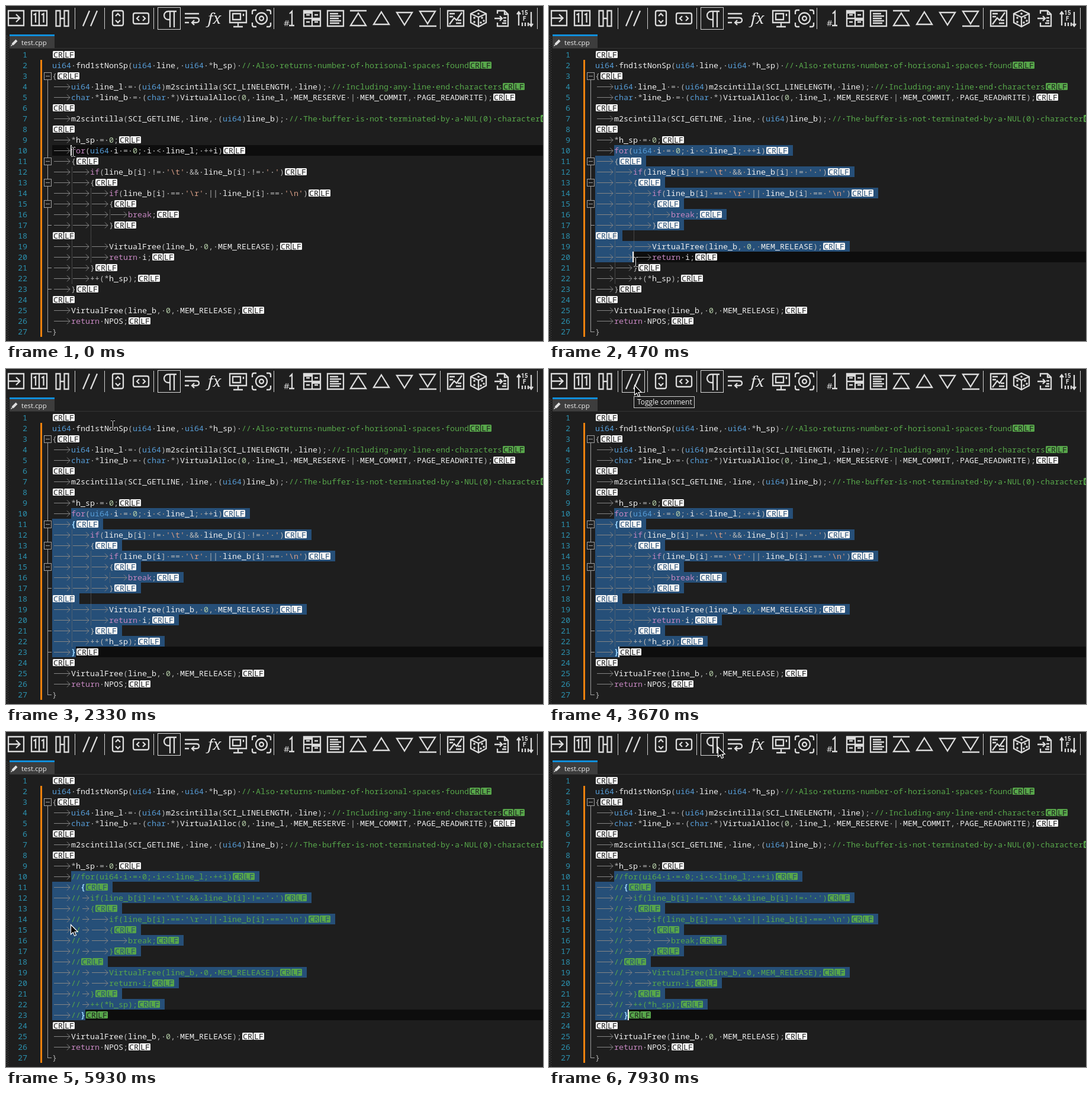
Recreate the animation shown at these times as an HTML page with a canvas. Size 907 px wide and 566 px high, loop 8 s.

```html
<!DOCTYPE html>
<html lang="en">
<head>
<meta charset="utf-8">
<title>Toggle comment</title>
<style>
html, body { margin: 0; width: 100%; height: 100%; overflow: hidden; background: #1e1e1e; }
canvas { display: block; }
</style>
</head>
<body>
<canvas id="stage" width="907" height="566"></canvas>
<script>
const c = document.getElementById('stage').getContext('2d');
const LOOP = 8000, LEFT = 78, CHAR = 8, ROW = 18, FIRST = 10, LAST = 23;
const MONO = '13.333px "Noto Sans Mono", monospace';
const UI = '12px "Open Sans", sans-serif';
const DRAG_END = 870, COMMENT_AT = 4070;

const code = String.raw`
ui64 fnd1stNonSp(ui64 line, ui64 *h_sp) // Also returns number of horisonal spaces found
{
>ui64 line_l = (ui64)m2scintilla(SCI_LINELENGTH, line); // Including any line end characters
>char *line_b = (char *)VirtualAlloc(0, line_l, MEM_RESERVE | MEM_COMMIT, PAGE_READWRITE);

>m2scintilla(SCI_GETLINE, line, (ui64)line_b); // The buffer is not terminated by a NUL(0) character

>*h_sp = 0;
>for(ui64 i = 0; i < line_l; ++i)
>{
>>if(line_b[i] != '\t' && line_b[i] != ' ')
>>{
>>>if(line_b[i] == '\r' || line_b[i] == '\n')
>>>{
>>>>break;
>>>}

>>>VirtualFree(line_b, 0, MEM_RELEASE);
>>>return i;
>>}
>>++(*h_sp);
>}

>VirtualFree(line_b, 0, MEM_RELEASE);
>return NPOS;
}`.split('\n').map(s => s.replace(/^>+/, m => '\t'.repeat(m.length)));
const commented = code.map((s, i) => i + 1 >= FIRST && i + 1 <= LAST ? '\t//' + s.slice(1) : s);

// Mouse way points: time, x, y
const path = [[0, 113, 246], [70, 113, 246], [470, 146, 432], [870, 122, 482], [1000, 122, 482],
  [1670, 205, 300], [2330, 180, 95], [2600, 152, 42], [2730, 144, 27], [3800, 144, 27], [3900, 146, 27],
  [5600, 146, 27], [5930, 109, 325], [6470, 96, 345], [7330, 285, 25], [LOOP, 285, 25]];
const blinks = [1020, 1550, 2080, 2610, 3140, 3660, 4260, 4930, 5500, 6370, 6900, 7430];

const icons = new Path2D(`M4 8H30V33H4Z M4 20.5H23 M17 14L23.500 20.500L17 27
M43 8H69V33H43Z M56 8V33 M46.500 15L50 13V28 M60 15L63.500 13V28
M84.500 8H91.500V34H84.500Z M98.500 8H105.500V34H98.500Z M92 21H98
M130 34L141 8 M143 34L154 8
M183 8H195Q198 8 198 11V30Q198 33 195 33H183Q180 33 180 30V11Q180 8 183 8Z M185 17L189 13L193 17 M185 24L189 28L193 24
M218 12H238Q241 12 241 15V27Q241 30 238 30H218Q215 30 215 27V15Q215 12 218 12Z M225 17L221 21L225 25 M231 17L235 21L231 25
M288 9H274A7 7 0 0 0 274 23H277 M277 9V36 M284 9V36
M302 13H326 M302 20H321Q326 20 326 24Q326 28 321 28H314 M318 24L314 28L318 32 M302 28H309
M378 8H406V28H378Z M383 13H396V23H383Z M401 13V17 M392 28V34 M384 35H400
M416 14V10Q416 7 419 7H423 M440 7H444Q447 7 447 10V14 M447 28V32Q447 35 444 35H440 M423 35H419Q416 35 416 32V28
M441 21A9.500 9.500 0 1 1 422 21A9.500 9.500 0 1 1 441 21 M435 21A3.500 3.500 0 1 1 428 21A3.500 3.500 0 1 1 435 21
M479 13L483 9V33 M478 33H487
M503 8H531V34H503Z M517 8V34 M503 21H531 M507 15H513M521 15H527M507 27H513M521 27H527
M543 8H570V34H543Z M547 13H561M547 17H566M547 21H562M547 25H566M547 29H563
M581 8H609 M595 12L608 33H582Z M634 10L647 31H621Z M673 32L660 11H686Z M712 30L699 9H725Z M698 34H727
M746 8H773V34H746Z M749 13H758M749 18H755M763 24H769M760 29H769 M749 31L757 20L761 24L770 11
M798 7L811 13V28L798 35L785 28V13Z M785 13L798 19L811 13 M798 19V35
M830 13V8H842L848 14V34H830V28 M842 8V14H848 M825 21H838 M834 17L838 21L834 25 M840 20H845M840 25H845M838 29H845
M866 11V33 M863 14L866 10L869 14 M872 28V34M877 28V34M882 28V34M887 10V34 M884 30L887 34L890 30`);
const dice = [[791, 20], [791, 27], [804, 20], [807, 25], [802, 28], [798, 13]];
const arrow = new Path2D('M0 0V16.500L3.800 13L6.300 19L9 17.800L6.500 12H11.700Z');
const beam = new Path2D('M-3.500 -8H-1L0 -7L1 -8H3.500 M0 -7V7 M-3.500 8H-1L0 7L1 8H3.500');

const rect = (x, y, w, h, col) => { c.fillStyle = col; c.fillRect(x, y, w, h); };
const box = (x, y, w, h, col) => { c.strokeStyle = col; c.lineWidth = 1; c.strokeRect(x + .5, y + .5, w - 1, h - 1); };
const text = (s, x, y, col, font = MONO, align = 'left') => {
  c.font = font; c.fillStyle = col; c.textAlign = align; c.fillText(s, x, y);
};
const middle = n => 64 + ROW * n;
const nextCol = (col, ch) => ch === '\t' ? (col >> 2) * 4 + 4 : col + 1;
const endX = s => LEFT + CHAR * [...s].reduce(nextCol, 0);
const tabs = s => s.match(/^\t*/)[0].length;

function mouseAt(t) {
  const i = path.findIndex(p => p[0] > t), a = path[i - 1], b = path[i];
  const k = (t - a[0]) / (b[0] - a[0]);
  return { x: a[1] + (b[1] - a[1]) * k, y: a[2] + (b[2] - a[2]) * k };
}

function tokenColor(s) {
  if (/^(ui64|char)$/.test(s)) return '#569cd6';
  if (/^(for|if|break|return)$/.test(s)) return '#c586c0';
  if (/^\d/.test(s)) return '#b5cea8';
  if (s[0] === "'") return '#d69d85';
  return /^\w/.test(s) ? '#eeeeee' : '#b4b4b4';
}

function tabArrow(x1, x2, y) {
  c.strokeStyle = '#858585';
  c.lineWidth = 1;
  c.beginPath();
  c.moveTo(x1 + 3, y + .5); c.lineTo(x2 - 2, y + .5);
  c.moveTo(x2 - 7, y - 4.5); c.lineTo(x2 - 2, y + .5); c.lineTo(x2 - 7, y + 5.5);
  c.stroke();
}

function lineEnd(x, y, fill, ink) {
  ['CR', 'LF'].forEach((s, i) => {
    c.fillStyle = fill;
    c.beginPath();
    c.roundRect(x + 1 + i * 19, y - 6, 18, 12, 1.5);
    c.fill();
    text(s, x + 2 + i * 19, y + 5, ink);
  });
}

function drawLine(s, n, sel, braces) {
  const y = middle(n), comment = s.indexOf('//');
  let col = 0, at = 0;
  for (const tok of s.match(/'[^']*'|\w+|[^\w]/g) || []) {
    const green = comment >= 0 && at >= comment;
    for (const ch of tok) {
      const x = LEFT + col * CHAR, next = nextCol(col, ch);
      if (ch === '\t') tabArrow(x, LEFT + next * CHAR, y);
      else if (ch === ' ') rect(x + 3, y, 2, 2, green ? '#57a64a' : '#808080');
      else {
        const match = braces && (n === 11 && ch === '{' || n === LAST && ch === '}');
        text(ch, x, y + 5, match ? '#99d5ff' : green ? '#57a64a' : tokenColor(tok), match ? 'bold ' + MONO : MONO);
      }
      col = next;
      at++;
    }
  }
  if (n < 27) lineEnd(LEFT + col * CHAR, y, comment >= 0 ? '#57a64a' : '#f4f4f4', sel ? '#264f78' : '#1e1e1e');
}

function guides(n) {
  const depth = n === 18 ? 3 : tabs(code[n - 1]);
  for (let k = 1; k < depth; k++)
    for (let y = middle(n) - 8; y < middle(n) + 9; y += 2) rect(LEFT + 32 * k + 1, y, 1, 1, '#707070');
}

function folds(open, ends) {
  const col = '#a0a0a0', x = 71;
  rect(x - 1, middle(3), 1, middle(27) - middle(3), col);
  ends.forEach(n => rect(x - 1, middle(n), 7, 1, col));
  open.forEach(n => {
    const y = middle(n);
    rect(x - 7, y - 6, 13, 13, '#1e1e1e');
    box(x - 7, y - 6, 13, 13, col);
    rect(x - 4, y, 7, 1, col);
  });
}

function toolbar(hover) {
  rect(0, 0, 907, 72, '#1f1f1f');
  [116, 166, 249, 452, 733, 897].forEach(x => rect(x, 3, 1, 36, '#d0d0d0'));
  c.strokeStyle = '#dcdcdc';
  c.lineWidth = 2.3;
  c.stroke(icons);
  rect(504, 9, 12, 4, '#dcdcdc');
  rect(518, 22, 12, 3, '#dcdcdc');
  dice.forEach(([x, y]) => { c.beginPath(); c.arc(x, y, 1.8, 0, 7); c.fillStyle = '#dcdcdc'; c.fill(); });
  text('fx', 341, 30, '#e4e4e4', 'italic 26px "Noto Serif", serif');
  text('#', 469, 34, '#e4e4e4', '15px "Open Sans", sans-serif');
  text('15', 870, 15, '#e4e4e4', 'bold 10px Roboto, sans-serif');
  text('F', 873, 25, '#e4e4e4', 'bold 10px Roboto, sans-serif');
  box(256, 2, 39, 38, '#dcdcdc');
  if (hover) box(123, 2, 39, 38, '#dcdcdc');

  rect(6, 48, 76, 24, '#3d3d3d');
  rect(6, 48, 76, 3, '#0f8fdc');
  rect(6, 71, 901, 1, '#343434');
  c.strokeStyle = '#e0e0e0';
  c.lineWidth = 4;
  c.beginPath(); c.moveTo(11, 65); c.lineTo(18, 58); c.stroke();
  c.lineWidth = 1.5;
  c.beginPath(); c.moveTo(8.5, 67.5); c.lineTo(12, 64); c.stroke();
  text('test.cpp', 26, 66, '#eeeeee', '11.5px "Open Sans", sans-serif');
  for (let y = 50; y < 566; y += 4) rect(1, y, 1, 1, '#555555'), rect(3, y + 2, 1, 1, '#555555');
}

function caretAt(t, m, lines) {
  if (t >= DRAG_END) return { n: LAST, x: endX(lines[LAST - 1]) };
  const n = Math.max(FIRST, Math.min(LAST, Math.round((m.y - 64) / ROW)));
  if (n === LAST) return { n, x: endX(lines[n - 1]) };
  const stop = Math.min(tabs(lines[n - 1]), Math.round((m.x - LEFT) / 32));
  return { n, x: LEFT + 32 * stop };
}

function pointer(m, isBeam) {
  c.save();
  c.translate(Math.round(m.x) + .5, Math.round(m.y) + .5);
  if (isBeam) {
    c.strokeStyle = '#000'; c.lineWidth = 3; c.stroke(beam);
    c.strokeStyle = '#fff'; c.lineWidth = 1; c.stroke(beam);
  } else {
    c.fillStyle = '#000'; c.fill(arrow);
    c.strokeStyle = '#fff'; c.lineWidth = 1.2; c.stroke(arrow);
  }
  c.restore();
}

function draw(t) {
  const m = mouseAt(t), isComment = t >= COMMENT_AT, lines = isComment ? commented : code;
  const caret = caretAt(t, m, lines), dragged = t >= DRAG_END;
  const selEnd = n => n < FIRST || n > caret.n ? 0 : n === caret.n ? caret.x : endX(lines[n - 1]) + 46;

  rect(0, 0, 907, 566, '#1e1e1e');
  toolbar(m.x > 122 && m.x < 162 && m.y < 42);
  rect(58, 91, 3, 468, '#ef820d');
  rect(LEFT, middle(caret.n) - 9, 907 - LEFT, ROW, '#0d0d0d');

  lines.forEach((s, i) => {
    const n = i + 1, from = n === FIRST ? LEFT + 32 : LEFT, to = selEnd(n);
    if (to > from) rect(from, middle(n) - 9, to - from, ROW, '#264f78');
    text(n, 36, middle(n) + 5, '#2b91af', MONO, 'right');
    drawLine(s, n, to && n < caret.n, dragged);
    if (!isComment) guides(n);
  });
  folds(isComment ? [3] : [3, 11, 13, 15], isComment ? [27] : [17, 21, 23, 27]);
  if (blinks.filter(b => b <= t).length % 2 === 0) rect(caret.x - 1, middle(caret.n) - 9, 2, ROW, '#f0f0f0');

  if (t > 3270 && t < 3930) {
    c.globalAlpha = Math.min(1, (t - 3270) / 200);
    rect(143, 46, 103, 20, '#1f1f1f');
    box(143, 46, 103, 20, '#d0d0d0');
    text('Toggle comment', 149, 60, '#f0f0f0', UI);
    c.globalAlpha = 1;
  }
  const over = Math.round((m.y - 64) / ROW);
  pointer(m, m.y > 72 && m.x > LEFT && !(dragged && m.x < selEnd(over)));
}

function frame(now) {
  draw(now % LOOP);
  requestAnimationFrame(frame);
}
draw(0);
requestAnimationFrame(frame);
</script>
</body>
</html>
```
